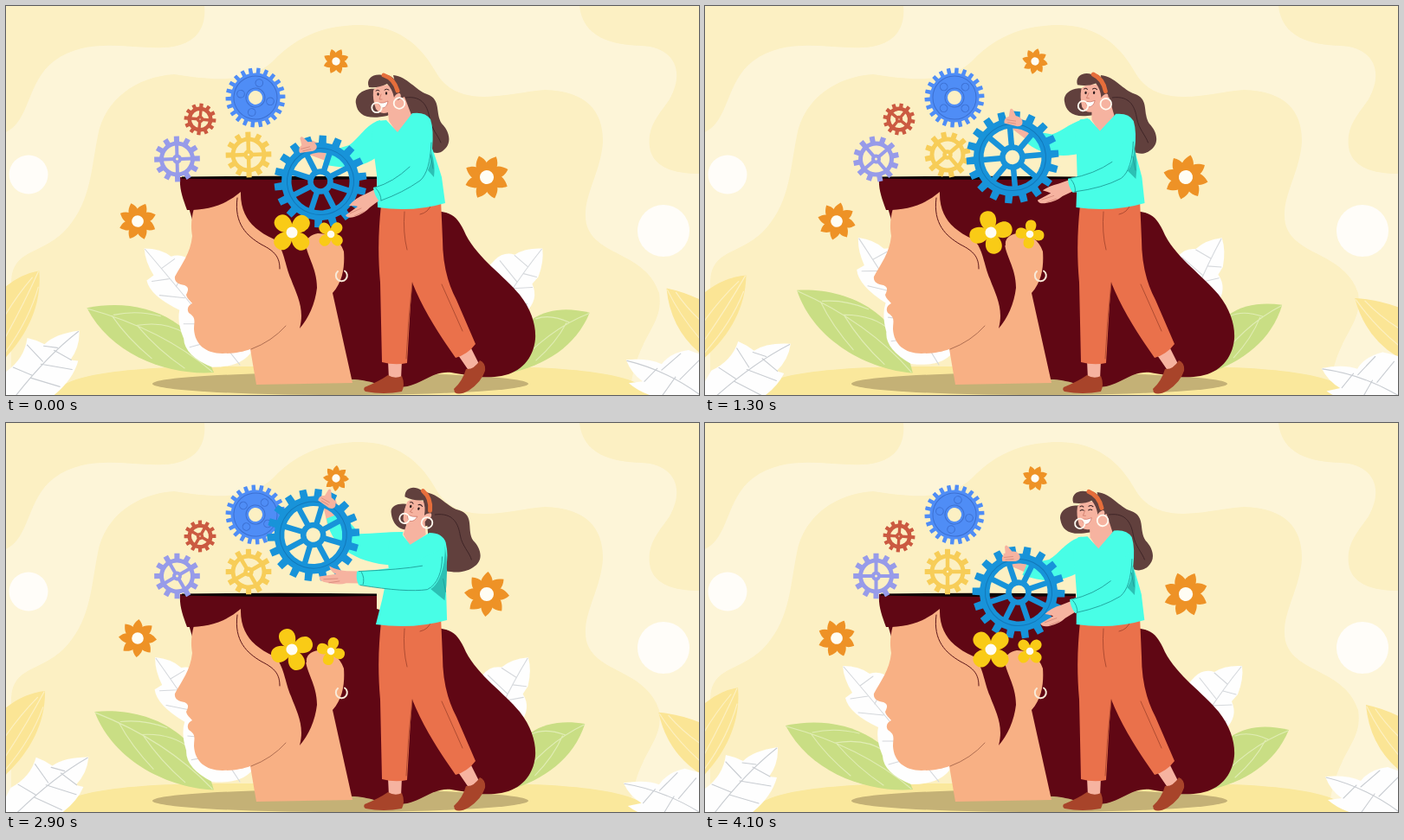
Animation, 800 px wide and 450 px high, one loop 4.2 s. Source, as an HTML page:

```html
<!DOCTYPE html>
<html lang="en">
<head>
<meta charset="utf-8">
<title>Gears of thought</title>
<style>
html, body { margin: 0; width: 100%; height: 100%; overflow: hidden; background: #fcf0c4; }
svg { display: block; width: 100vw; height: 100vh; }
.line { fill: none; stroke-linecap: round; stroke-linejoin: round; }
</style>
</head>
<body>
<svg id="stage" viewBox="0 0 800 450">
  <rect width="800" height="450" fill="#fdf5d8"/>
  <g fill="#fcf0c3">
    <path d="M0 0H229C232 30 214 47 182 48C140 50 95 35 55 64C24 88 28 132 0 146Z"/>
    <path d="M662 0C666 36 698 45 734 46C772 48 784 76 766 108C752 128 738 142 744 168C750 188 774 194 800 194V0Z"/>
    <path d="M6 450V318C8 282 38 288 66 262C98 230 98 190 106 150C114 108 150 82 194 79C240 86 280 90 308 64C338 32 372 22 410 22C452 23 478 44 496 76C522 122 580 100 622 97C672 98 690 124 689 158C686 196 664 222 670 252C680 290 738 284 754 332C760 372 728 378 720 450Z"/>
  </g>
  <circle cx="26" cy="195" r="22.5" fill="#fffdf9"/>
  <circle cx="759" cy="260" r="30" fill="#fffdf9"/>
  <path d="M54 450C62 430 120 417 250 417H550C680 417 735 430 746 450Z" fill="#fae89c"/>
  <g id="leaves"></g>
  <ellipse cx="386" cy="437" rx="217" ry="13" fill="#c4b176"/>

  <g id="bust">
    <path fill="#600714" d="M201 198H428V215L503 238C520 240 525 252 531 265C545 292 575 312 593 334C607 352 612 370 611 385C609 408 594 424 572 428C550 432 528 426 514 424C490 422 480 440 455 441C430 440 420 432 399 432L340 380L230 300Z"/>
    <path fill="#f8b084" d="M217 234C214 246 213 254 215 266C213 286 203 298 195 313C194 319 199 322 206 323C211 325 211 328 208 334C209 339 213 341 215 344C211 346 208 350 211 355C220 361 217 364 217 374C218 391 230 402 250 402C264 402 274 400 282 397L289 438L400 436L377 332C390 318 391 298 390 284C385 270 376 264 360 263C350 265 346 270 347 277L315 276L271 212Z"/>
    <path fill="#600714" d="M201 198H330V250C350 255 353 263 346 273C346 288 359 302 359 326C357 344 349 362 339 373C345 350 336 335 329 316C322 300 321 280 310 270C292 262 270 248 271 215C252 231 233 236 209 236C204 222 200 212 201 198Z"/>
    <path d="M203 197.500Q315 196 428 197.500V200Q315 202 203 199.500Z" fill="#0d0305"/>
    <path class="line" stroke="#5b1518" stroke-width="1" d="M267 222C263 252 278 266 295 276C311 284 316 291 316 304"/>
    <path class="line" stroke="#a8674c" stroke-width=".9" d="M283 397Q307 388 323 370"/>
    <path class="line" stroke="#f8ead8" stroke-width="2" d="M383 307A6.500 6.500 0 1 0 391 306.500"/>
  </g>
  <g id="small"></g>

  <g id="farArm">
    <path id="farSkin" fill="#f6b3a0"/>
    <path id="farSleeve" fill="#48fee6"/>
  </g>
  <path id="tail" fill="#61403d"/>
  <path id="tailLine" class="line" stroke="#3f2527"/>
  <path id="wisp" fill="#61403d"/>
  <g id="legs">
    <path fill="#f6b3a0" d="M441 410H457L456 432H442ZM522 404L537 396L546 414L535 423Z"/>
    <path fill="#a8442a" d="M414 441Q431 434 441 427Q449 432 457 428Q461 438 457 446Q436 450 415 446Q412 444 414 441ZM517 443Q527 434 531 420Q540 421 547 410Q554 413 553 422Q549 435 534 445Q523 451 518 447Z"/>
    <path fill="#ea714b" d="M433 230C430 260 429 285 432 320L434 412Q449 416 463 413L467 345L469 320C482 352 500 380 519 407Q533 403 542 391L520 340Q504 310 504 270L502 224Z"/>
    <path class="line" stroke="#a9482f" stroke-width=".9" d="M460 238Q458 262 463 282M491 229Q488 239 478 241M469 320Q464 365 462 408M503 322L527 376"/>
  </g>
  <path id="neck" fill="#f6b3a0"/>
  <path id="torso" fill="#48fee6"/>
  <path id="shade" fill="#2cc0b4"/>
  <g id="head">
    <path fill="#f6b3a0" d="M424 98Q427 91 446 91L453 104Q452 118 441 123Q432 126 427 119Q423 108 424 98Z"/>
    <circle cx="452" cy="104" r="3.800" fill="#f6b3a0"/>
    <path fill="#61403d" d="M419 94C415 84 424 78 434 80C445 77 453 88 455 100Q449 102 448 106Q446 96 440 90Q431 95 419 94Z"/>
    <path class="line" stroke="#e66e3b" stroke-width="5" stroke-linecap="butt" d="M436 80Q448 84 452 98"/>
    <g id="eyesOpen" fill="#2c1a1c"><ellipse cx="429.500" cy="102" rx="1.200" ry="1.700"/><ellipse cx="439" cy="101" rx="1.200" ry="1.700"/></g>
    <path id="eyesShut" class="line" stroke="#2c1a1c" stroke-width="1" d="M427.500 102.500Q429.500 100.500 431.500 102M437 101.500Q439 99.500 441 101"/>
    <path class="line" stroke="#3f2527" stroke-width="1" d="M427 98Q429 96 431 98M437 97Q439 95 442 97"/>
    <path class="line" stroke="#d2806f" stroke-width=".9" d="M433 102L431 108L434 108"/>
    <path fill="#fff" stroke="#c76050" stroke-width=".6" d="M430 112Q436 113 441 110Q440 117 435 118Q431 117 430 112Z"/>
    <g fill="none" stroke="#fffaf0" stroke-width="1.800"><circle cx="428" cy="117.500" r="5.700"/><circle cx="454" cy="112.500" r="6.300"/></g>
  </g>
  <g id="big"></g>
  <g id="farHand">
    <path fill="#f6b3a0" d="M-11 5Q-12 -1 -6 -3L-5 -11Q-3 -14 -1 -10L2 -4Q9 -3 10 3Q10 8 4 8Z"/>
    <path class="line" stroke="#d48677" stroke-width=".7" d="M-8 1L2 2M-7 4L2 5"/>
  </g>
  <path id="hand" fill="#f6b3a0"/>
  <path id="fingers" class="line" stroke="#d48677" stroke-width=".8"/>
  <path id="sleeve" fill="#48fee6"/>
  <path id="folds" class="line" stroke="#1f9d98" stroke-width=".9"/>
  <g id="earFlowers"></g>
  <g id="blooms"></g>
</svg>
<script>
const $ = id => document.getElementById(id);
const LOOP = 4200, STEP = 100, TAU = Math.PI * 2;
const spinners = [];

function add(parent, tag, attrs) {
  const el = document.createElementNS('http://www.w3.org/2000/svg', tag);
  for (const k in attrs) el.setAttribute(k, attrs[k]);
  return parent.appendChild(el);
}

// A group placed at x,y that turns by base + swing * sway
function spinner(parent, x, y, base, swing) {
  const el = add(parent, 'g', {});
  spinners.push({ el, x, y, base, swing });
  return el;
}

const ring = r => `M${r} 0A${r} ${r} 0 1 0 ${-r} 0A${r} ${r} 0 1 0 ${r} 0Z`;

function teeth(n, outer, root) {
  const pts = [];
  for (let i = 0; i < n; i++) {
    [[-.28, root], [-.22, outer], [.22, outer], [.28, root]].forEach(([d, r]) => {
      const a = (i + d) * TAU / n;
      pts.push((r * Math.cos(a)).toFixed(2) + ' ' + (r * Math.sin(a)).toFixed(2));
    });
  }
  return 'M' + pts.join('L') + 'Z';
}

function gear(g, o) {
  add(g, 'path', { d: teeth(o.n, o.r, o.root) + ring(o.hole), fill: o.fill, 'fill-rule': 'evenodd' });
  for (let i = 0; i < (o.spokes || 0); i++) {
    add(g, 'path', { d: `M0 ${-o.hub}V${-o.hole - 1}`, stroke: o.fill, 'stroke-width': o.w,
      transform: `rotate(${i * 360 / o.spokes})` });
  }
  if (o.spokes) add(g, 'circle', { r: o.hub, fill: 'none', stroke: o.fill, 'stroke-width': o.w });
  (o.lines || []).forEach(r => add(g, 'circle', { r, fill: 'none', stroke: o.dark, 'stroke-width': 1 }));
}

const small = $('small');
const blue = spinner(small, 288, 106, 13, 38);
gear(blue, { n: 22, r: 34.5, root: 28.5, hole: 8, fill: '#4f8df6', dark: '#3c70d2', lines: [25, 11] });
for (let i = 0; i < 4; i++)
  add(blue, 'circle', { cx: 0, cy: -17.5, r: 4.3, fill: 'none', stroke: '#3c70d2', transform: `rotate(${i * 90})` });
gear(spinner(small, 224, 131, 4, 41),
  { n: 12, r: 18.5, root: 14.5, hole: 10, spokes: 4, hub: 2.5, w: 3.4, fill: '#cb5a41' });
gear(spinner(small, 197.5, 177, 0, -48),
  { n: 12, r: 26.5, root: 20.5, hole: 15.5, spokes: 4, hub: 3.5, w: 4, fill: '#979be9' });
gear(spinner(small, 280, 172, 0, -48),
  { n: 12, r: 26.5, root: 20.5, hole: 15.5, spokes: 4, hub: 3.5, w: 4.5, fill: '#f7cd58' });
gear($('big'), { n: 18, r: 53.5, root: 45, hole: 33.5, spokes: 8, hub: 11.5, w: 6.5,
  fill: '#1893d9', dark: '#1278ba', lines: [38.5] });

[[330, 262, 1, 45, 38], [375, 264, .66, 45, -45]].forEach(([x, y, k, base, swing]) => {
  const g = add(spinner($('earFlowers'), x, y, base, swing), 'g', { transform: `scale(${k})` });
  for (let i = 0; i < 4; i++)
    add(g, 'path', { d: 'M0 0C-13 -8 -12 -25 0 -25S13 -8 0 0Z', fill: '#f9cb16', transform: `rotate(${i * 90})` });
  add(g, 'circle', { r: 6.5, fill: '#fffdf4' });
});

[[152, 249, 22], [381, 64, 15], [555, 198, 26]].forEach(([x, y, r]) => {
  const g = add(spinner($('blooms'), x, y, 20, 40), 'g', { transform: `scale(${r})` });
  for (let i = 0; i < 8; i++)
    add(g, 'path', { d: 'M0 0C-.42 -.4 -.3 -.72 .06 -1C.32 -.7 .34 -.4 0 0Z', fill: '#ee9226', transform: `rotate(${i * 45})` });
  add(g, 'circle', { r: .31, fill: '#fffdf4' });
});

// outline, veins, fill, vein colour, pivot x, pivot y, swing
const leaves = [
  ['M38 306C42 350 20 392 -20 425V345Q5 312 38 306Z', 'M37 307Q18 350 -10 400M30 314Q8 340 -8 370M37 325Q26 365 -4 405', '#fbe595', '#fdf1c4', -10, 400, 7],
  ['M763 326Q792 332 820 350V415Q768 384 763 326Z', 'M764 328Q782 366 815 400M774 331Q790 355 815 375', '#fbe595', '#fdf1c4', 830, 410, -11],
  ['M93 350C150 338 214 356 240 424C190 428 122 406 93 350Z', 'M94 351Q180 374 238 423M124 358Q150 352 178 359M150 370Q185 364 208 380M122 359Q140 385 168 408M152 371Q175 398 206 419', '#c9de84', '#e1edb5', 236, 423, 10.500],
  ['M674 355C632 345 600 355 575 400L580 425C622 416 658 394 674 355Z', 'M673 356Q626 374 584 422M650 366Q628 356 612 362M647 367Q635 390 612 410', '#c9de84', '#e1edb5', 580, 425, -7],
  ['M159 281Q178 281 190 290Q204 286 213 296L262 330L286 395Q276 418 238 418Q206 405 205 385Q197 366 200 352Q166 336 162 318L170 312Q160 296 159 281Z',
    'M160 282Q210 340 270 415M179 304L194 293M196 325L208 300M188 316L168 319M206 338L177 335M230 368L205 368M244 386L212 395', '#fefefe', '#d5d8dc', 270, 415, 8.600],
  ['M620 281Q600 280 588 288Q575 284 565 294L530 330L540 400L600 355Q616 340 608 322L615 314Q622 296 620 281Z',
    'M619 282Q580 330 542 398M603 302L588 289M590 319L571 295M598 310L613 314M585 327L608 326M575 343L602 345', '#fefefe', '#d5d8dc', 540, 400, -12.500],
  ['M84 375Q56 379 44 391Q34 386 24 384Q21 408 0 423L-18 475L46 457Q76 436 83 410L74 409Q85 394 84 375Z',
    'M83 376Q46 405 8 455M59 395L43 393M42 411L24 392M30 427L8 418M55 398L75 409M40 414L76 420M28 430L62 440', '#fefefe', '#c9cdd2', 10, 460, 13],
  ['M716 409Q742 407 757 414Q767 401 788 398Q800 402 825 412V475L762 454Q736 451 719 436L735 434Q722 425 716 409Z',
    'M717 410Q766 422 808 455M757 421L779 402M778 432L800 410M752 419L737 434M773 429L758 450', '#fefefe', '#c9cdd2', 810, 455, -7],
].map(([d, veins, fill, stroke, x, y, swing]) => {
  const el = add($('leaves'), 'g', {});
  add(el, 'path', { d, fill });
  add(el, 'path', { d: veins, stroke, class: 'line', 'stroke-width': 1.1 });
  return { el, x, y, swing };
});

// Two poses of each part, low and high
const poses = {
  neck: ['M440 115L442 133L452 148L468 126L460 105Z', 'M463 112L458 129L466 143L484 129L482 105Z'],
  torso: ['M439 132L452 146L469 124Q484 122 490 131Q494 143 492 165Q496 175 503 198L507 228Q470 239 429 233L428 195L424 165Q420 145 428 133Z',
    'M455 127L466 141L488 127Q503 127 507 138Q511 155 506 172Q506 180 508 198L509 228Q470 239 427 233L434 204L441 168Q438 140 446 127Z'],
  shade: ['M491 168C491 178 489 186 487 190L494 198Q496 184 491 168Z', 'M506 142C507 166 500 186 490 192L506 205Q511 170 506 142Z'],
  tail: ['M447 80C464 82 472 97 486 102C503 108 495 124 503 136C512 145 515 158 506 166C500 172 494 170 490 168C488 150 480 132 458 126Z',
    'M482 80C500 82 508 98 522 101C540 107 530 124 538 136C548 146 550 160 538 167C526 175 514 172 507 171C510 152 506 134 486 128Z'],
  tailLine: ['M461 106C482 103 487 118 489 130S499 150 502 158', 'M494 106C516 103 521 118 523 130S534 150 536 158'],
  wisp: ['M428 96C416 94 402 101 404 113C406 126 416 132 440 127L456 118L455 92Z',
    'M464 95C456 92 443 94 443 103C444 114 449 125 466 124L488 118L487 92Z'],
  sleeve: ['M491 145C493 175 488 193 478 202C464 214 444 223 431 226Q425 219 424 210C440 206 450 196 462 186Z',
    'M504 145C507 167 499 186 486 193C462 197 430 191 408 189Q404 181 406 173C430 172 455 168 474 160Z'],
  folds: ['M491 158C490 180 486 195 478 202Q458 216 433 225M466 186Q447 204 426 210M427 211Q433 217 433 225M490 172L493 188',
    'M503 155C503 172 498 187 486 193Q462 197 410 189M480 166Q455 171 408 173M411 174Q415 181 413 188M504 180L507 195'],
  hand: ['M428 211L414 218Q403 222 396 231Q404 231 406 232L392 242Q394 246 402 244Q414 240 420 233L432 224Z',
    'M410 173L394 173Q382 172 374 168Q376 175 382 177L363 180Q362 186 372 187Q386 190 394 187L410 187Z'],
  fingers: ['M397 240L410 234M402 243L413 238', 'M368 183L384 182M374 187L386 185']
};
const farPoses = {
  farSkin: ['M342 158L352 155L385 168L380 183L350 172Z', 'M365 88L379 87L389 116L372 122L366 98Z'],
  farSleeve: ['M432 132C415 137 408 153 396 161L370 169L366 183C392 189 412 188 432 172Z',
    'M458 126C440 126 425 128 408 129L387 105L370 112C374 140 400 163 448 165Z']
};

function mix(a, b, k) {
  const re = /-?[\d.]+/g, to = b.match(re);
  let i = 0;
  return a.replace(re, n => (+n + (to[i++] - n) * k).toFixed(2));
}

// Smooth periodic curve through a few key values
const KEYS = [0, 500, 1300, 1800, 2500, 3300, 4100];
function track(vals) {
  const n = KEYS.length;
  const at = i => KEYS[(i + n) % n] + Math.floor(i / n) * LOOP;
  const v = i => vals[(i + n) % n];
  const slope = i => (v(i + 1) - v(i - 1)) / (at(i + 1) - at(i - 1));
  return t => {
    let i = n - 1;
    while (KEYS[i] > t) i--;
    const h = at(i + 1) - at(i), u = (t - at(i)) / h, w = 1 - u;
    return v(i) * (1 + 2 * u) * w * w + slope(i) * h * u * w * w
      + v(i + 1) * u * u * (3 - 2 * u) - slope(i + 1) * h * u * u * w;
  };
}
const sway = track([.03, .385, .85, 1, .85, .385, 0]);
const lean = track([0, .16, .28, .52, 1, .92, .16]);
const gearX = track([363, 357, 355, 353, 356, 354, 362]);
const gearY = track([203, 185, 175, 160, 131, 139, 196]);

function draw(t) {
  const s = sway(t), k = lean(t), x = gearX(t), y = gearY(t);
  const lift = (203 - y) / 72;
  const turn = -27 + 43 * Math.max(0, lift) ** .7;
  const place = (id, tf) => $(id).setAttribute('transform', tf);

  spinners.forEach(g => g.el.setAttribute('transform', `translate(${g.x} ${g.y}) rotate(${g.base + g.swing * s})`));
  leaves.forEach(l => l.el.setAttribute('transform', `rotate(${l.swing * s} ${l.x} ${l.y})`));
  for (const id in poses) $(id).setAttribute('d', mix(...poses[id], k));
  for (const id in farPoses) $(id).setAttribute('d', mix(...farPoses[id], lift));

  place('head', `translate(${31 * k} ${-2 * k}) rotate(${21 * k} 441 114.5)`);
  place('big', `translate(${x} ${y}) rotate(${turn})`);
  // The far hand grips the rim and turns with it
  place('farHand', `translate(${x} ${y}) rotate(${turn + 7}) translate(0 -44)`);

  const shut = t >= 400 && t < 600 || t >= 4000;
  $('eyesOpen').style.display = shut ? 'none' : '';
  $('eyesShut').style.display = shut ? '' : 'none';
}

const start = performance.now();
function tick() {
  const t = (performance.now() - start) % LOOP;
  draw(Math.floor(t / STEP) * STEP);
  requestAnimationFrame(tick);
}
tick();
</script>
</body>
</html>
```
